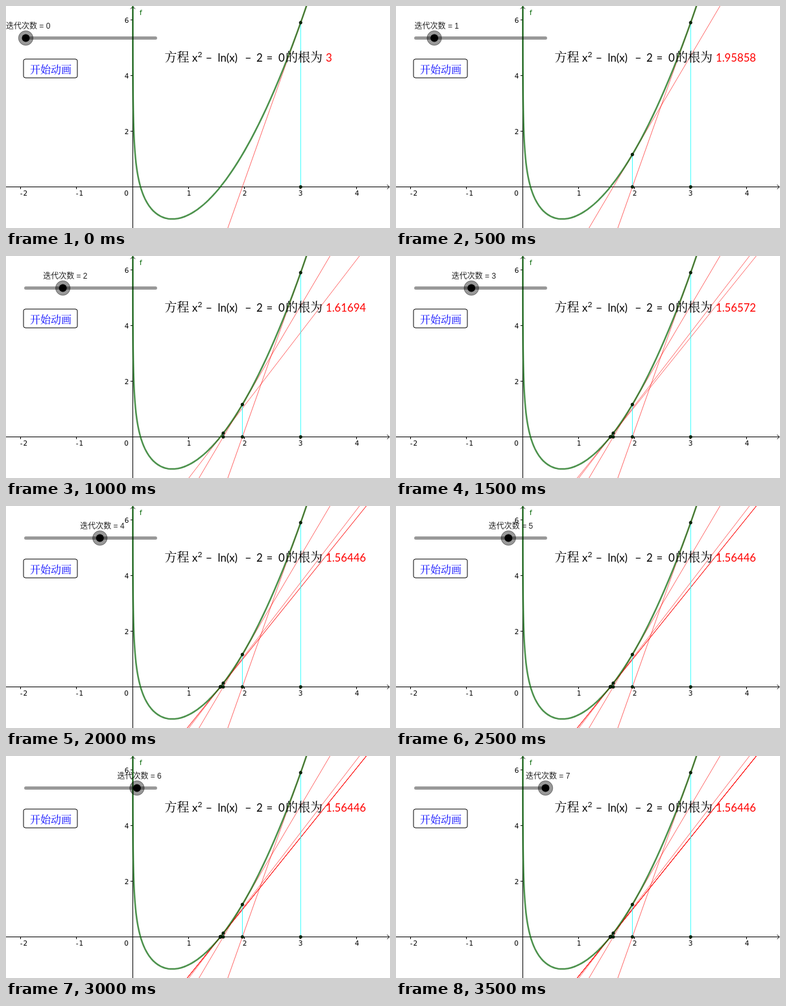
Write an HTML page that moves like this. It is 592x343 px and loops after 4000 ms.

```html
<!DOCTYPE html>
<html lang="zh-CN">
<head>
<meta charset="utf-8">
<title>牛顿迭代法</title>
<style>
  html, body { margin: 0; width: 100%; height: 100%; overflow: hidden; background: #fff; }
  svg { display: block; width: 592px; height: 343px; }
  .axis { stroke: #000; fill: none; }
  .ticks { font: 10.5px "DejaVu Sans", sans-serif; }
  .curve { stroke: #006400; stroke-opacity: .7; stroke-width: 2.5; fill: none; stroke-linejoin: round; }
  .tangent { stroke: #f00; stroke-opacity: .75; stroke-width: .8; }
  .drop { stroke: #0ff; stroke-opacity: .8; }
  .dot { fill: #063006; stroke: #000; stroke-width: .8; }
  .label { font: 12px "Liberation Sans", "Noto Sans CJK SC", sans-serif; fill: #222; }
  .han { font: 300 19px "Noto Serif CJK SC", "Noto Sans CJK SC", "Noto Sans CJK", serif; }
  .math { font: 16.7px Lato, sans-serif; }
  .sup { font-size: 12px; }
  .button { font: 300 16px "Noto Serif CJK SC", "Noto Sans CJK SC", "Noto Sans CJK", serif; fill: #00f; }
</style>
</head>
<body>
<svg viewBox="0 0 592 343">
  <g id="axes">
    <path class="axis" d="M0 279.5H591M587.5 276L591 279.5L587.5 283M195.5 343V1M192 4.5L195.5 1L199 4.5"/>
  </g>
  <g id="tangents"></g>
  <g id="drops"></g>
  <path id="curve" class="curve"/>
  <g id="dots"></g>
  <text class="ticks" x="206" y="14" fill="#006400">f</text>

  <g id="formula">
    <text class="han" x="244.5" y="86">方程</text>
    <text class="han" x="431" y="86">的根为</text>
    <text id="root" class="math" x="493" y="86" fill="#f00"></text>
  </g>

  <rect x="27" y="82" width="83" height="29" rx="3" fill="#fff" stroke="#000"/>
  <text class="button" x="37" y="104">开始动画</text>

  <path d="M30.5 49.5H230.5" stroke="#000" stroke-opacity=".4" stroke-width="5" stroke-linecap="round"/>
  <g id="knob">
    <circle cx="30.5" cy="49.5" r="11.2" fill-opacity=".4" stroke="#000" stroke-opacity=".4"/>
    <circle cx="30.5" cy="49.5" r="6"/>
    <text id="count" class="label" x="0" y="34.5"></text>
  </g>
</svg>
<script>
  const $ = id => document.getElementById(id);
  const STEP = 500, STEPS = 8;
  const f = x => x * x - Math.log(x) - 2;
  const slope = x => 2 * x - 1 / x;
  const px = x => 195.5 + 86.25 * x;
  const py = y => 279.5 - 43 * y;

  function add(parent, tag, attrs, text = '') {
    const el = document.createElementNS('http://www.w3.org/2000/svg', tag);
    for (const name in attrs) el.setAttribute(name, attrs[name]);
    el.textContent = text;
    $(parent).append(el);
    return el;
  }
  const line = (parent, cls, x1, y1, x2, y2) =>
    add(parent, 'line', { class: cls, x1: px(x1), y1: py(y1), x2: px(x2), y2: py(y2) });
  const dot = (x, y) => add('dots', 'circle', { class: 'dot', cx: px(x), cy: py(y), r: 2.2 });
  const tick = (x, y, anchor, text) =>
    add('axes', 'text', { class: 'ticks', x, y, 'text-anchor': anchor }, text);

  for (const n of [-2, -1, 1, 2, 3, 4]) {
    const x = Math.round(px(n)) - .5;
    add('axes', 'path', { class: 'axis', d: `M${x} 280v3` });
    tick(n < 0 ? x + 5 : x + .5, 293, 'middle', n < 0 ? '-\u200a' + -n : n);
  }
  for (const n of [2, 4, 6]) {
    add('axes', 'path', { class: 'axis', d: `M192 ${py(n)}h3` });
    tick(189.5, py(n) + 4, 'end', n);
  }
  tick(189, 293, 'end', 0);

  // Even spacing in ln(x) keeps the steep left branch smooth.
  const points = [];
  for (let u = -9; u < 1.2; u += .03) {
    const x = Math.exp(u);
    points.push(px(x).toFixed(2) + ' ' + py(f(x)).toFixed(2));
  }
  $('curve').setAttribute('d', 'M' + points.join('L'));

  const terms = [[287, 'x'], [308, '−'], [326.5, 'ln(x)'], [368.5, '−'], [386, '2'], [401.5, '='], [420, '0']];
  for (const [x, text] of terms) add('formula', 'text', { class: 'math', x, y: 86 }, text);
  add('formula', 'text', { class: 'math sup', x: 295.5, y: 79 }, '2');

  const roots = [], stages = [];
  for (let k = 0, x = 3; k < STEPS; k++) {
    const y = f(x), m = slope(x);
    const at = v => y + m * (v - x);
    roots.push(x);
    stages.push([
      line('tangents', 'tangent', -1, at(-1), 6, at(6)),
      line('drops', 'drop', x, 0, x, y),
      dot(x, 0),
      dot(x, y)
    ]);
    x -= y / m;
  }

  let shown = -1;
  function draw(now) {
    const k = Math.floor(now / STEP) % STEPS;
    if (k !== shown) {
      shown = k;
      stages.forEach((parts, i) => parts.forEach(el => el.style.display = i <= k ? '' : 'none'));
      $('knob').setAttribute('transform', `translate(${k * 200 / 7} 0)`);
      $('count').textContent = '迭代次数 = ' + k;
      $('root').textContent = +roots[k].toFixed(5);
    }
  }
  const start = performance.now();
  function loop() {
    draw(performance.now() - start);
    requestAnimationFrame(loop);
  }
  loop();
</script>
</body>
</html>
```
